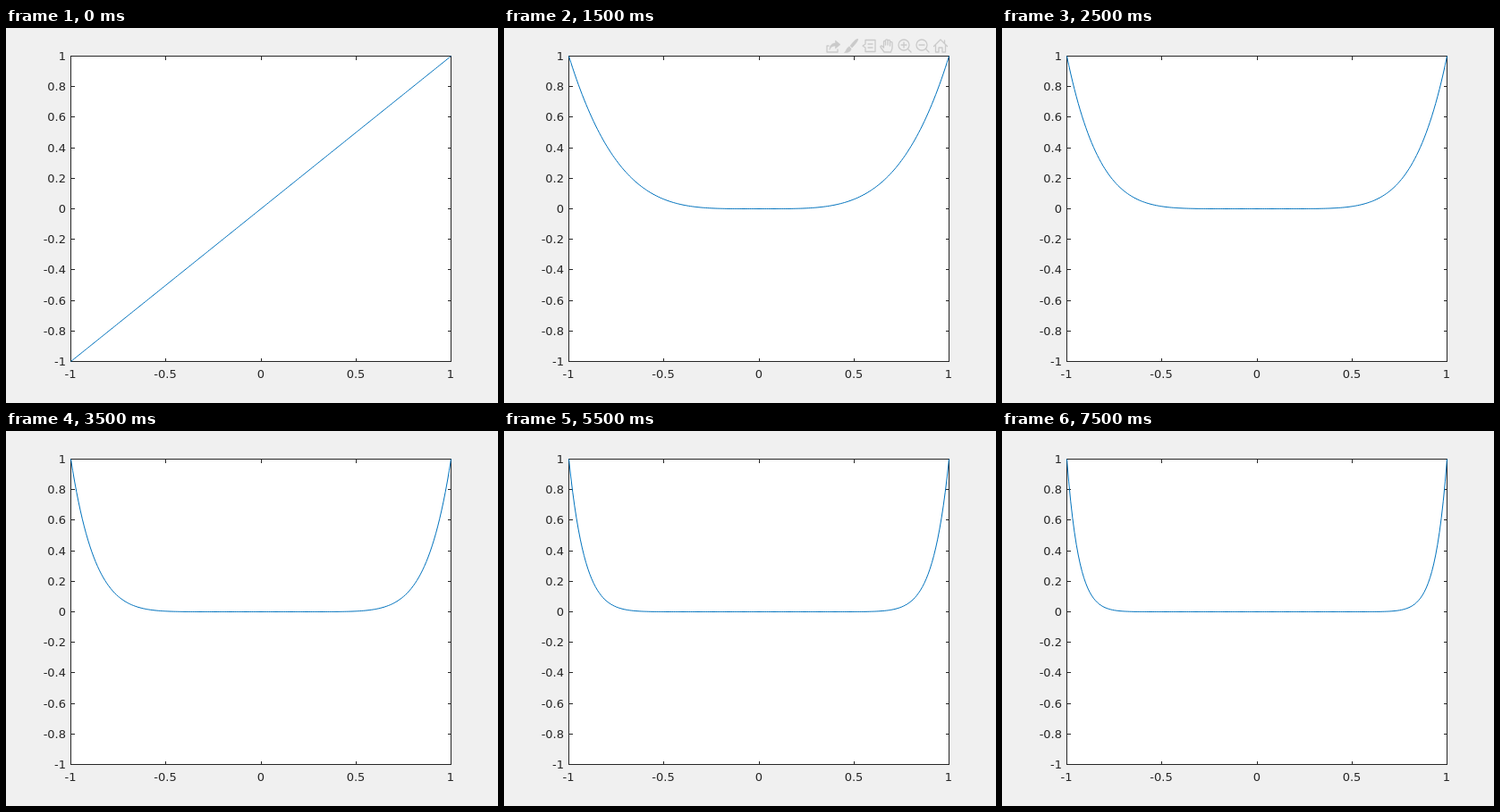
These frames come from a looping animation (550 by 420 pixels, 8 s). An HTML page:

```html
<!DOCTYPE html>
<html lang="en">
<head>
<meta charset="utf-8">
<title>Powers of x</title>
<style>
  html, body { margin: 0; width: 100%; height: 100%; overflow: hidden; background: #f0f0f0; }
  svg { display: block; }
  text { font: 13px "DejaVu Sans", sans-serif; fill: #262626; }
  #axes { fill: none; stroke: #262626; shape-rendering: crispEdges; }
  #curve { fill: none; stroke: #0072bd; stroke-linejoin: round; }
  #tools { fill: none; stroke: #666; stroke-width: 1.3; stroke-linejoin: round; stroke-linecap: round; }
  #tools .solid { fill: #666; stroke-width: .6; }
</style>
</head>
<body>
<svg width="550" height="420" viewBox="0 0 550 420">
  <rect x="72" y="31" width="426" height="343" fill="#fff"/>
  <path id="axes"/>
  <g id="labels"></g>
  <path id="curve"/>
  <g id="tools">
    <g transform="translate(360 12)">
      <path d="M3 8H1V15H13V12"/>
      <path class="solid" d="M4 12C4 7 7 5 10.500 5V2L16 6.500L10.500 11V8C7.500 8 5.500 9 4 12Z"/>
    </g>
    <g class="solid" transform="translate(380 12)">
      <path d="M15.500 .5C16.500 1.500 13 6 9 10L7 8C10 4 14 -.5 15.500 .5Z"/>
      <path d="M6 9L8 11C8 14 5 16 .5 15.500C3 14 2.500 10 6 9Z"/>
    </g>
    <g transform="translate(400 12)">
      <path d="M4 1.500H15V14.500H4V10L1 8L4 6ZM7 6H12M7 10H12"/>
    </g>
    <g transform="translate(420 12)">
      <path d="M5 15L1 9.500C.5 8 2 7.500 3 8.500L4.500 10V3.500C4.500 2 6.500 2 6.500 3.500V7V2C6.500 .5 9 .5 9 2V7V2.500C9 1 11.500 1 11.500 2.500V8V4.500C11.500 3 14 3 14 4.500V10C14 12 13 13 12.500 15Z"/>
    </g>
    <g transform="translate(440 12)">
      <circle cx="7" cy="7" r="6"/>
      <path d="M11.500 11.500L15 15M4 7H10M7 4V10"/>
    </g>
    <g transform="translate(460 12)">
      <circle cx="7" cy="7" r="6"/>
      <path d="M11.500 11.500L15 15M4 7H10"/>
    </g>
    <g transform="translate(480 12)">
      <path d="M.5 8.500L8 1L15.500 8.500M2.500 7.500V15H6V10H10V15H13.500V7.500M12.500 5V2"/>
    </g>
  </g>
</svg>
<script>
const STEP = 500, STEPS = 16;
const LEFT = 72.5, RIGHT = 497.5, TOP = 31.5, BOTTOM = 373.5;
const TOOL_OPACITY = [0, .25, .5, .27];   // toolbar fades in and out, then stays hidden
const $ = id => document.getElementById(id);
const px = x => LEFT + (x + 1) / 2 * (RIGHT - LEFT);
const py = y => BOTTOM - (y + 1) / 2 * (BOTTOM - TOP);
const snap = v => Math.floor(v) + .5;

function label(text, x, y, anchor) {
  return `<text x="${x}" y="${y}" text-anchor="${anchor}">${text}</text>`;
}

function drawAxes() {
  let path = `M${LEFT} ${TOP}H${RIGHT}V${BOTTOM}H${LEFT}Z`, labels = "";
  for (let i = -2; i <= 2; i++) {
    const x = snap(px(i / 2));
    path += `M${x} ${BOTTOM}v-4M${x} ${TOP}v4`;
    labels += label(i / 2, x - .5, 392, "middle");
  }
  for (let i = -5; i <= 5; i++) {
    const y = snap(py(i / 5));
    path += `M${LEFT} ${y}h4M${RIGHT} ${y}h-4`;
    labels += label(i / 5, 67, y + 4.5, "end");
  }
  $("axes").setAttribute("d", path);
  $("labels").innerHTML = labels;
}

function drawCurve(power) {
  const points = Array.from({ length: 201 }, (_, i) => {
    const x = i / 100 - 1;
    return px(x).toFixed(2) + " " + py(x ** power).toFixed(2);
  });
  $("curve").setAttribute("d", "M" + points.join("L"));
}

let shown = -1;
function frame() {
  const step = Math.floor(performance.now() / STEP) % STEPS;
  if (step !== shown) {
    shown = step;
    drawCurve(step + 1);
    $("tools").setAttribute("opacity", TOOL_OPACITY[step] || 0);
  }
  requestAnimationFrame(frame);
}

drawAxes();
frame();
</script>
</body>
</html>
```
